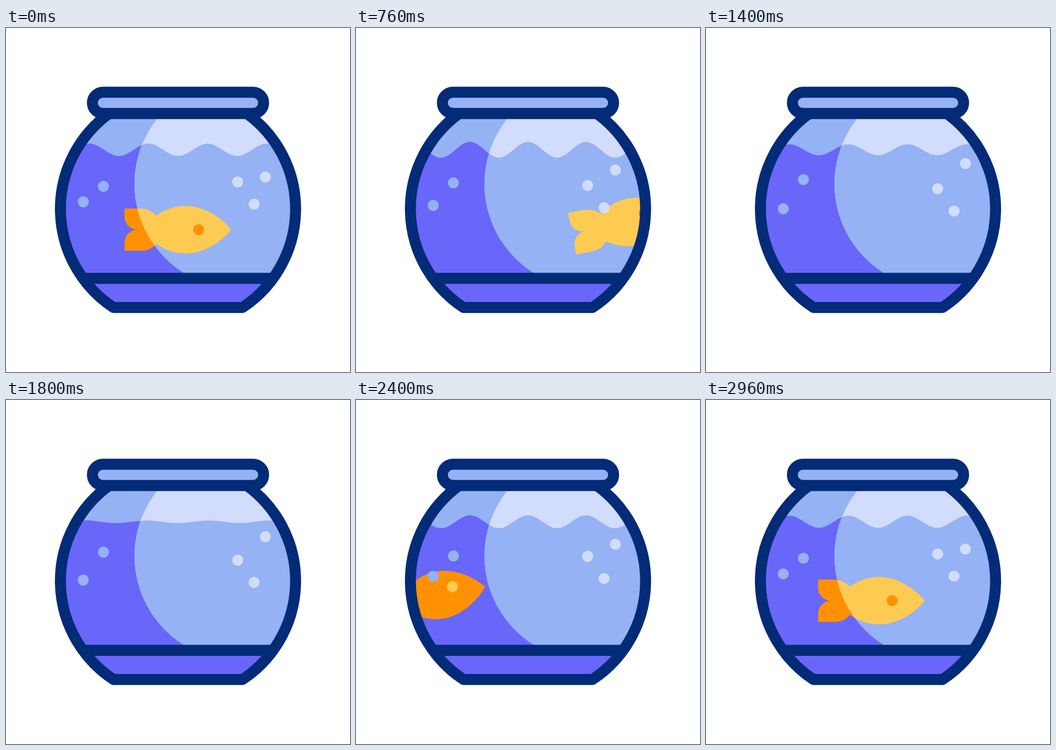
These frames come from a looping animation (640 px wide and 640 px high, 3000 ms). An HTML page:

```html
<!DOCTYPE html>
<html lang="en">
<head>
<meta charset="utf-8">
<title>Fishbowl</title>
<style>
  html, body { margin: 0; width: 100%; height: 100%; overflow: hidden; background: #fff; }
  svg { display: block; width: 100vw; height: 100vh; }
</style>
</head>
<body>
<svg id="stage" viewBox="0 0 640 640"></svg>
<script>
const LOOP = 3000, STEP = 40;
const NAVY = '#042b77', PURPLE = '#6966fa', BLUE = '#94b2f4', PALE = '#d2dcfd';
const ORANGE = '#ff9100', YELLOW = '#fecb52';
const NOSE = { x: 419, y: 375.2 };

const BOWL = 'M192 159A219.4 219.4 0 0 0 200 520H440A219.4 219.4 0 0 0 448 159Z';
const FISH = `M279.5 349C296 337 315 331 335 331C370 331 403 355 419 375.2
  C403 395.4 370 419.4 335 419.4C315 419.4 296 413.4 279.5 401.4
  C272 410 264 414.4 252 414.4H220.5V400C220.5 386 231 375.2 245 375.2
  C231 375.2 220.5 364.4 220.5 350.4V335.8H247C260 335.8 271 340 279.5 349Z`;

// x, resting y, vertical travel
const LEFT_BUBBLES = [[181.3, 294.6, -12.8], [143.7, 323.5, 13]];
const RIGHT_BUBBLES = [[431, 286.4, 12.8], [482.6, 277.3, -25.6], [461.5, 327.7, 13]];
const bubbles = [...LEFT_BUBBLES, ...RIGHT_BUBBLES];

const scene = (air, water, fish, eye) => `
  <rect x="80" y="150" width="480" height="390" fill="${air}"/>
  <path class="water" fill="${water}"/>
  <path class="fish" d="${FISH}" fill="${fish}"/>
  <circle class="eye" cx="358.3" cy="${NOSE.y}" r="10.3" fill="${eye}"/>`;

const bubbleMarkup = ([x], i) =>
  `<circle class="bubble" cx="${x}" r="10.3" fill="${i < LEFT_BUBBLES.length ? BLUE : PALE}"/>`;

const stage = document.getElementById('stage');
stage.innerHTML = `
  <defs>
    <clipPath id="bowl"><path d="${BOWL}"/></clipPath>
    <clipPath id="shine"><circle cx="434" cy="290" r="195"/></clipPath>
  </defs>
  <g clip-path="url(#bowl)">
    ${scene(BLUE, PURPLE, ORANGE, YELLOW)}
    <g clip-path="url(#shine)">${scene(PALE, BLUE, YELLOW, ORANGE)}</g>
    ${bubbles.map(bubbleMarkup).join('')}
    <rect x="80" y="466" width="480" height="70" fill="${PURPLE}"/>
    <path d="M100 465.8H540" stroke="${NAVY}" stroke-width="20.4"/>
  </g>
  <g stroke="${NAVY}" stroke-width="20.4" stroke-linejoin="round">
    <path d="${BOWL}" fill="none"/>
    <rect x="160.7" y="119.5" width="318.6" height="39.5" rx="19.75" fill="${BLUE}"/>
  </g>`;

const all = name => [...stage.querySelectorAll('.' + name)];
const waters = all('water'), fishes = all('fish'), eyes = all('eye'), dots = all('bubble');

const smooth = u => u * u * (3 - 2 * u);
// Eased 0 → 1 → 0 over one period
const swing = (t, period) => {
  const u = (t % period) / period * 2;
  return smooth(u < 1 ? u : 2 - u);
};

function waterPath(t) {
  const k = swing(t, LOOP / 2);
  let d = 'M80 540';
  for (let x = 80; x <= 560; x += 4) {
    const a = 2 * Math.PI * (x - 320);
    const y = 226.6 + 11.5 * (1 - k) * Math.cos(a / 110) - 14.7 * k * Math.cos(a / 108);
    d += `L${x} ${y.toFixed(2)}`;
  }
  return d + 'L560 540Z';
}

// Offset of the nose from its resting place, with the tilt around it
function fishPose(t) {
  if (t < 1600) {
    const u = t / 1000;
    return { x: 234 * u, y: -u * (50.8 + 26.1 * u - 51.7 * u * u), tilt: -u * (18.1 - 4.4 * u) };
  }
  const s = (LOOP - t) / 1000;
  return {
    x: -298 * s,
    y: -s * (47.9 + 57.4 * s - 99.7 * s * s),
    tilt: -11 * Math.sin(Math.PI * s / 1.4) ** 2
  };
}

function draw(t) {
  const surface = waterPath(t);
  waters.forEach(w => w.setAttribute('d', surface));

  const { x, y, tilt } = fishPose(t);
  const move = `translate(${x} ${y})`;
  fishes.forEach(f => f.setAttribute('transform', `${move} rotate(${tilt} ${NOSE.x} ${NOSE.y})`));
  eyes.forEach(e => e.setAttribute('transform', move));

  const k = swing(t, LOOP);
  dots.forEach((dot, i) => dot.setAttribute('cy', bubbles[i][1] + bubbles[i][2] * k));
}

const start = performance.now();
function tick() {
  const t = (performance.now() - start) % LOOP;
  draw(Math.floor(t / STEP) * STEP);
  requestAnimationFrame(tick);
}
tick();
</script>
</body>
</html>
```
